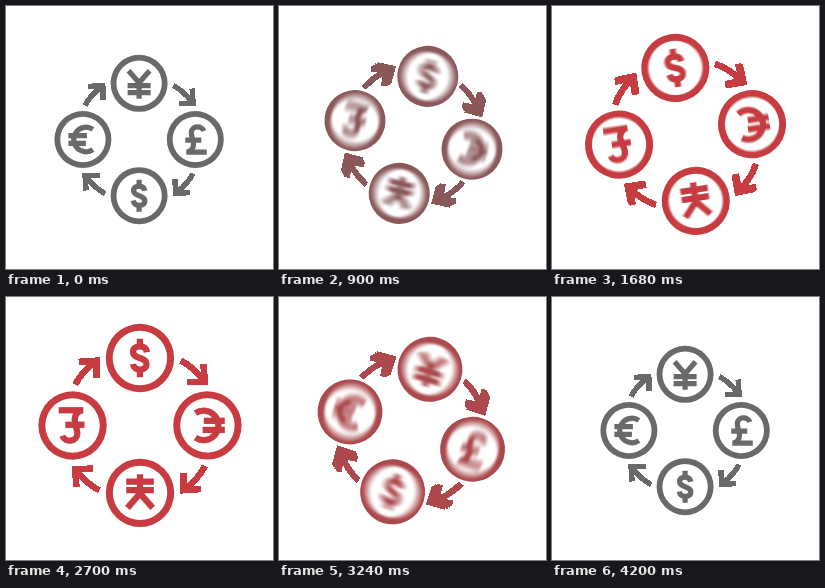
These frames come from a looping animation (267x263 px, 4500 ms). An HTML page:

```html
<!DOCTYPE html>
<html lang="en">
<head>
<meta charset="utf-8">
<title>Currency wheel</title>
<style>
  html, body { margin: 0; width: 100%; height: 100%; overflow: hidden; background: #fff; }
  svg { display: block; width: 100vw; height: 100vh; }
  path { fill: none; stroke: currentColor; }
  #arrows, #discs circle { shape-rendering: crispEdges; }
</style>
</head>
<body>
<svg id="stage" viewBox="0 0 267 263">
  <defs>
    <clipPath id="discs"></clipPath>
    <filter id="soften" filterUnits="userSpaceOnUse" x="-10" y="-10" width="287" height="283" color-interpolation-filters="sRGB">
      <feGaussianBlur id="blur" stdDeviation="0"/>
    </filter>
    <g id="faces"></g>
    <g id="arrows"></g>
  </defs>
  <g id="trails"></g>
  <g clip-path="url(#discs)"><g id="layers"></g></g>
</svg>
<script>
const LOOP = 4500, STEP = 30, LAG = 7, TURN_TIME = 1500;
const TURN = 540, GROW = 0.2;
const SHUTTER = 15, SAMPLES = 9, SOFTNESS = 85;
const GREY = [105, 105, 105], RED = [200, 59, 64];
const ORBIT = 56.2, OUTER = 28.5, INNER = 22.7;

// Yen, pound, dollar and euro, clockwise from the top
const GLYPHS = [
  'M-10.5,-12.5L0,-.5L10.5,-12.5M0,-1V15.5M-11.5,2.3H11.5M-11.5,9.3H11.5',
  'M8.5,-8.5C6.5,-14.5 -4,-14 -4,-6.5C-4,-3 -1.8,1 -1.8,5C-1.8,9 -5,12.7 -9,12.7H11.5M-10,.6H6',
  'M5.8,-5C5.2,-8 3.2,-9.6 0,-9.6C-3.6,-9.6 -5.5,-7.8 -5.5,-5.2C-5.5,-1.6 -2.5,-.9 0,0C3,1.1 5.7,1.8 5.7,5.2C5.7,8.2 3.4,9.6 0,9.6C-3.4,9.6 -5.3,8 -5.9,4.8M0,-16V-9.5M0,9.5V16',
  'M10,-10.2A12.3 12.3 0 1 0 10,10.2M-14.5,-3.8H4M-14.5,3.8H3'
];
const ARROW = 'M-54,-34Q-49,-44 -38,-52.5M-51,-53L-36.3,-54L-36,-39.5';

const $ = id => document.getElementById(id);
const stage = $('stage'), discs = $('discs'), faces = $('faces'), arrows = $('arrows');
const trails = $('trails'), layers = $('layers'), blur = $('blur');

function add(parent, tag, attrs) {
  const el = document.createElementNS('http://www.w3.org/2000/svg', tag);
  for (const key in attrs) el.setAttribute(key, attrs[key]);
  return parent.appendChild(el);
}

GLYPHS.forEach((d, i) => {
  const a = i * Math.PI / 2;
  const x = ORBIT * Math.sin(a), y = -ORBIT * Math.cos(a);
  add(discs, 'circle', { cx: x, cy: y, r: OUTER });
  const coin = add(faces, 'g', { transform: `translate(${x} ${y})` });
  add(coin, 'circle', { r: INNER, fill: '#fff' });
  add(coin, 'path', { d, 'stroke-width': 5.2 });
  add(arrows, 'path', { d: ARROW, 'stroke-width': 5.4, transform: `rotate(${i * 90})` });
});

// Layer i at opacity 1/(i+1) makes the stack an even average
const copies = Array.from({ length: SAMPLES }, (_, i) => {
  const layer = add(layers, 'g', { opacity: 1 / (i + 1) });
  add(layer, 'rect', { x: -10, y: -10, width: 287, height: 283, fill: 'currentColor' });
  return { layer, wheel: add(layer, 'use', { href: '#faces' }) };
});

// Arrows smear into one solid shape
const ghosts = [-0.33, -0.11, 0.11, 0.33].map(shift =>
  ({ shift, wheel: add(trails, 'use', { href: '#arrows' }) }));

function ease(u) {
  u = Math.min(1, Math.max(0, u));
  return u * u * (3 - 2 * u);
}

const progress = t => ease((t - 300) / TURN_TIME) - ease((t - 2700) / TURN_TIME);

const pose = p =>
  `translate(133.5 131.2) rotate(${TURN * p}) scale(${1 + GROW * p}) translate(-.4 2.3)`;

function draw(ms) {
  const t = Math.floor((ms % LOOP) / STEP) * STEP + LAG;
  const p = progress(t);
  const smear = Math.abs(progress(t + SHUTTER / 2) - progress(t - SHUTTER / 2));
  const moving = smear > 0.0002;
  const place = (wheel, shift) =>
    wheel.setAttribute('transform', pose(moving ? progress(t + shift * SHUTTER) : p));

  stage.style.color = `rgb(${GREY.map((c, i) => Math.round(c + (RED[i] - c) * p))})`;
  discs.setAttribute('transform', pose(p));
  ghosts.forEach(({ shift, wheel }) => place(wheel, shift));
  copies.forEach(({ layer, wheel }, i) => {
    layer.style.display = moving || i === 0 ? '' : 'none';
    place(wheel, i / (SAMPLES - 1) - 0.5);
  });
  blur.setAttribute('stdDeviation', SOFTNESS * smear);
  if (moving) layers.setAttribute('filter', 'url(#soften)');
  else layers.removeAttribute('filter');
}

const start = performance.now();
function tick() {
  draw(performance.now() - start);
  requestAnimationFrame(tick);
}
tick();
</script>
</body>
</html>
```
